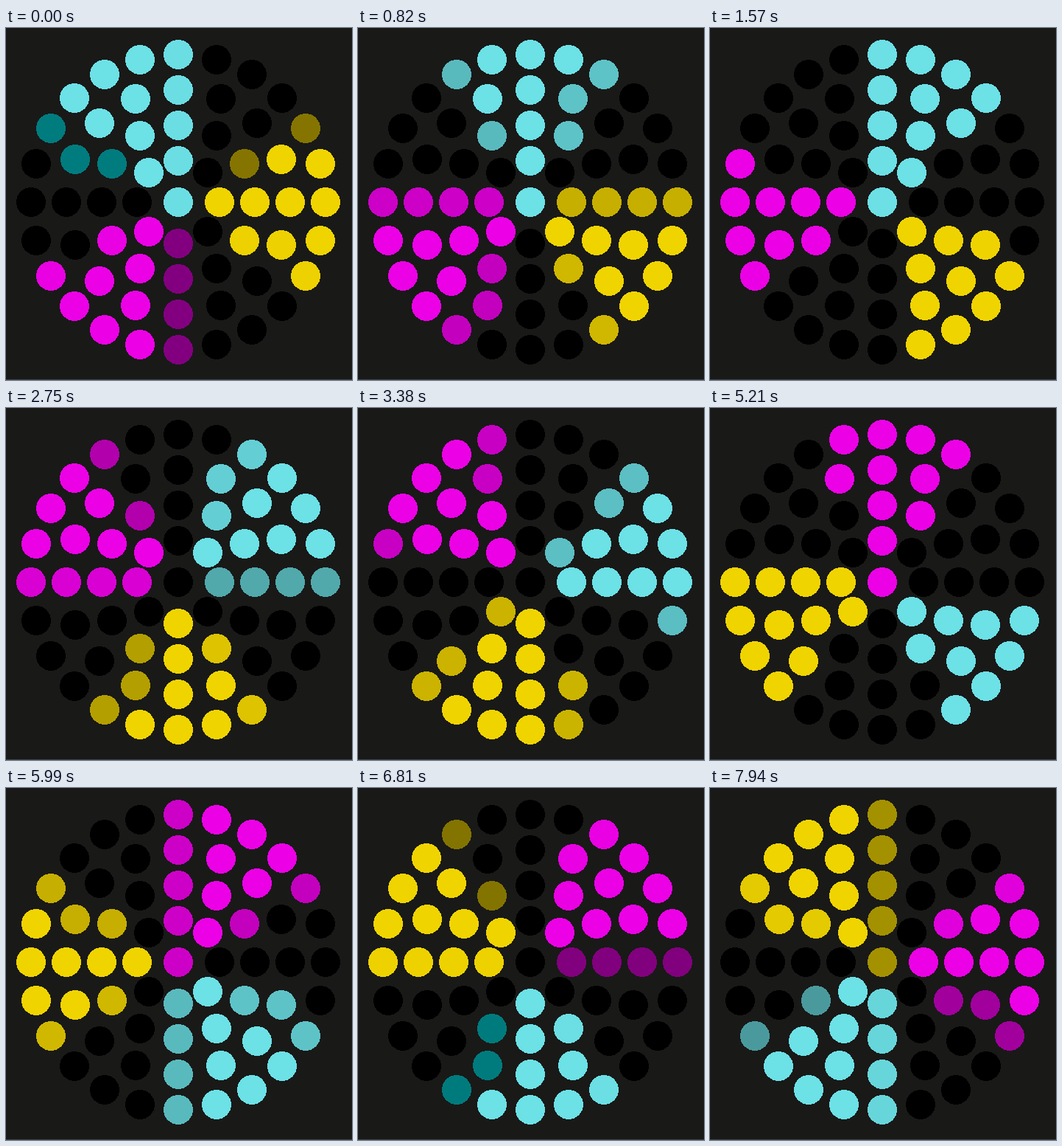
An HTML page for the animation above (8000 ms loop, 470 by 477 pixels).

```html
<!DOCTYPE html>
<html>
<head>
<meta charset="utf-8">
<title>LED disk</title>
<style>
html, body { margin: 0; width: 100%; height: 100%; overflow: hidden; background: #191918; }
svg { display: block; shape-rendering: crispEdges; }
</style>
</head>
<body>
<svg id="disk" width="470" height="477"><rect y="476" width="470" height="1" fill="#39444a"/></svg>
<script>
const LOOP = 8000, REFRESHES = 115, TICK = LOOP / REFRESHES;
const STEP = 520;   // ms to turn by one spoke
const SPOKES = 24;
const COLORS = [[108, 225, 230], [240, 212, 0], [236, 0, 230]];
const disk = document.getElementById('disk');

// Rings of LEDs: [count, radius]; each LED belongs to one spoke
const leds = [];
for (const [n, r] of [[24, 200], [16, 152], [12, 104], [8, 56], [1, 0]]) {
  for (let i = 0; i < n; i++) {
    const a = i / n * 2 * Math.PI;
    const dot = document.createElementNS('http://www.w3.org/2000/svg', 'circle');
    dot.setAttribute('cx', 234 + Math.round(r * Math.sin(a)));
    dot.setAttribute('cy', 236 - Math.round(r * Math.cos(a)));
    dot.setAttribute('r', 20);
    disk.append(dot);
    leds.push({ dot, spoke: Math.ceil(i * SPOKES / n) });
  }
}

const mod = (a, n) => ((a % n) + n) % n;

// Perceived brightness of an LED, in ms since it began to light up
function fade(ms) {
  const level = Math.min(1, (ms / 540) ** 0.26);
  return level < 0.52 ? 0 : level;
}

// The weaker channels drop out first when dimming
const shade = (rgb, level) =>
  `rgb(${rgb.map(v => v < 128 && level < 0.6 ? 0 : Math.round(v * level))})`;

function draw(time) {
  const tick = Math.min(REFRESHES - 1, Math.floor((time + 38) / TICK));
  const t = tick * TICK - 5;
  const head = Math.floor(t / STEP) + 1, u = mod(t, STEP);
  const levels = [fade(u), 1, 1, 1, fade(570 - u), 0, 0, 0];

  for (const { dot, spoke } of leds) {
    const back = mod(head - spoke, SPOKES);
    // three wedges a third of a turn apart
    const wedge = mod(-Math.floor(back / 8), 3);
    dot.setAttribute('fill', shade(COLORS[wedge], levels[back % 8]));
  }
}

const start = performance.now();
function frame() {
  draw((performance.now() - start) % LOOP);
  requestAnimationFrame(frame);
}
frame();
</script>
</body>
</html>
```
